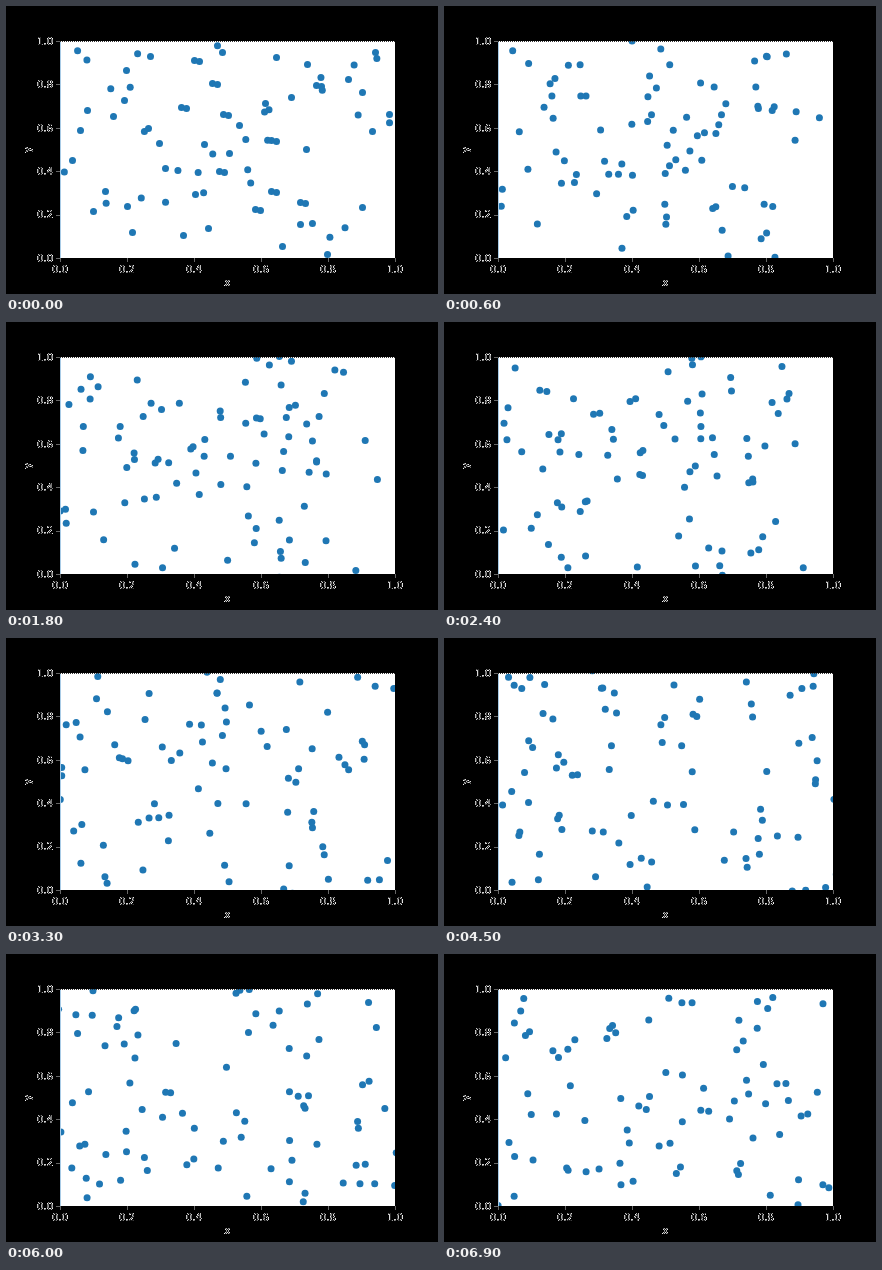
An HTML page with a canvas for the animation above (7.2 s loop, 432x288 px).

```html
<!DOCTYPE html>
<html lang="en">
<head>
<meta charset="utf-8">
<title>Bouncing scatter</title>
<style>
  html, body { margin: 0; width: 100%; height: 100%; overflow: hidden; background: #000; }
  canvas { display: block; }
</style>
</head>
<body>
<canvas id="stage" width="432" height="288"></canvas>
<script>
const W = 432, H = 288, STEP = 300, STEPS = 24;
const box = { left: 54, top: 35, right: 389, bottom: 252 };
const width = box.right - box.left, height = box.bottom - box.top;
const ctx = document.getElementById('stage').getContext('2d');

// Starting x, y pairs; the first TWINS of them have a close neighbour.
const TWINS = 10, COUNT = 85;
const start = [
  175,101, 217,108, 265,185, 213,165, 294,196, 249,203, 265,134, 310,79, 206,77, 188,54,
  144,50, 120,64, 216,46, 270,51, 301,58, 369,46, 342,73, 356,86, 285,91, 259,97,
  383,108, 81,104, 118,94, 107,110, 233,119, 74,124, 142,122, 153,137, 198,138, 223,147,
  300,143, 366,125, 66,154, 159,162, 99,185, 121,200, 189,188, 87,205, 126,226, 177,229,
  202,222, 294,218, 276,240, 321,248, 356,201
];

let seed = 17;
function random() {
  seed = (seed * 16807) % 2147483647;
  return seed / 2147483647;
}

function makeDots() {
  const dots = [];
  const add = (x, y) => dots.push({
    x, y, vx: (random() - 0.5) * 0.1 * width, vy: (random() - 0.5) * 0.1 * height
  });
  for (let i = 0; i < start.length; i += 2) {
    add(start[i], start[i + 1]);
    if (i < TWINS * 2) add(start[i] + 5, start[i + 1] + 1);
  }
  while (dots.length < COUNT) add(box.left + random() * width, box.top + random() * height);
  return dots;
}

// A dot may overshoot the border by one step before it turns back.
function turn(position, speed, low, high) {
  if (position < low) return Math.abs(speed);
  if (position > high) return -Math.abs(speed);
  return speed;
}

function advance(dot) {
  const x = dot.x + dot.vx, y = dot.y + dot.vy;
  return {
    x, y,
    vx: turn(x, dot.vx, box.left, box.right),
    vy: turn(y, dot.vy, box.top, box.bottom)
  };
}

const states = [makeDots()];
while (states.length < STEPS) states.push(states[states.length - 1].map(advance));

// Labels are dark ink whose soft edges show up light on black.
function makeLabels() {
  const canvas = document.createElement('canvas');
  canvas.width = W;
  canvas.height = H;
  const ink = canvas.getContext('2d');
  ink.font = '10px "DejaVu Sans", sans-serif';

  for (let i = 0; i <= 5; i++) {
    const label = (i / 5).toFixed(1);
    const x = box.left + width * i / 5, y = box.bottom - height * i / 5;
    ink.textAlign = 'center';
    ink.fillText(label, x, 266.6);
    ink.textAlign = 'right';
    ink.fillText(label, 47, y + 3.8);
    ink.globalAlpha = 0.6;
    ink.fillRect(Math.round(x), box.bottom, 1, 4);
    ink.fillRect(box.left - 4, Math.round(y), 4, 1);
    ink.globalAlpha = 1;
  }
  ink.textAlign = 'center';
  ink.fillText('x', 221.4, 280);
  ink.translate(25, 143.5);
  ink.rotate(-Math.PI / 2);
  ink.fillText('y', 0, 0);

  const image = ink.getImageData(0, 0, W, H), data = image.data;
  for (let i = 0; i < data.length; i += 4) {
    const alpha = data[i + 3];
    if (alpha < 8) continue;
    data[i] = data[i + 1] = data[i + 2] = 255 - alpha;
    data[i + 3] = 255;
  }
  ink.putImageData(image, 0, 0);
  return canvas;
}
const labels = makeLabels();

function draw(dots) {
  ctx.fillStyle = '#000';
  ctx.fillRect(0, 0, W, H);
  ctx.drawImage(labels, 0, 0);

  ctx.save();
  ctx.beginPath();
  ctx.rect(box.left, box.top, width, height);
  ctx.clip();
  ctx.fillStyle = '#fff';
  ctx.fillRect(box.left, box.top, width, height);
  ctx.fillStyle = '#1f77b4';
  for (const { x, y } of dots) {
    ctx.beginPath();
    ctx.arc(x + 0.5, y + 0.5, 3.5, 0, Math.PI * 2);
    ctx.fill();
  }
  ctx.restore();

  ctx.fillStyle = '#a8cbe6';
  ctx.fillRect(box.left, box.top, 1, height);
  ctx.fillStyle = '#333';
  for (let x = box.left; x < box.right; x += 2) ctx.fillRect(x, box.top, 1, 1);
}

let shown = -1;
function tick() {
  const step = Math.floor(performance.now() / STEP) % STEPS;
  if (step !== shown) draw(states[shown = step]);
  requestAnimationFrame(tick);
}
tick();
</script>
</body>
</html>
```
